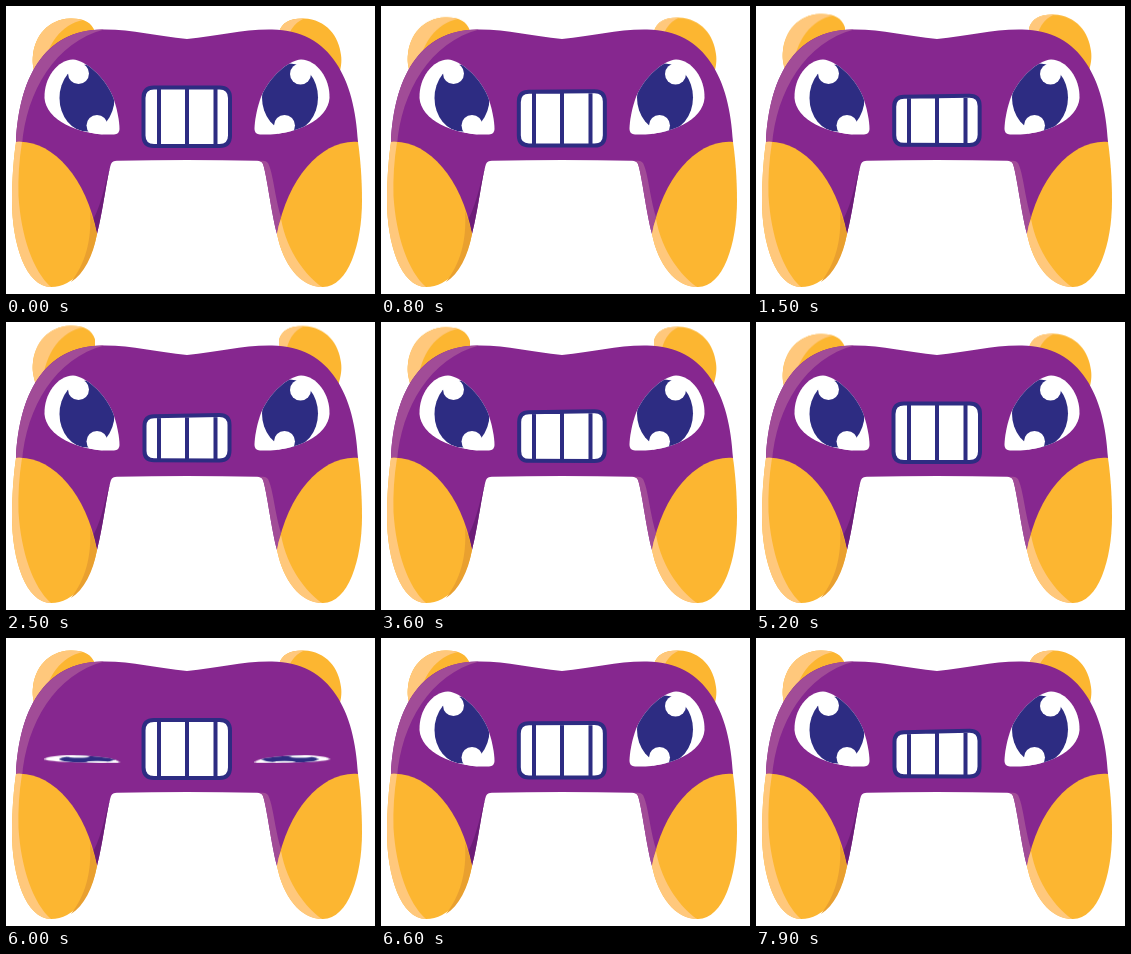
Write an HTML page that moves like this. It is 369 by 288 pixels and loops after 8000 ms.

```html
<!DOCTYPE html>
<html lang="en">
<head>
<meta charset="utf-8">
<title>Gamepad character</title>
<style>
  html, body { margin: 0; width: 100%; height: 100%; overflow: hidden; background: #fff; }
  svg { display: block; width: 369px; height: 288px; }

  .purple { fill: #86278f; }
  .purple-light { fill: #a14c97; }
  .purple-dark { fill: #6c1d78; }
  .yellow { fill: #fcb631; }
  .yellow-light { fill: #ffc87c; }
  .yellow-dark { fill: #e9a02f; }
  .navy { fill: #2d2c82; }
  .white { fill: #fff; }

  .button, .eye, .mouth { animation: 8s linear infinite; }
  .button { animation-timing-function: cubic-bezier(.35, 0, .65, 1); }
  .button.left { animation-name: rise-left; }
  .button.right { animation-name: rise-right; }
  .eye { animation-name: blink; transform-origin: 0 124.5px; }
  /* Open and nearly shut jaw, with the tooth gaps as extra strokes */
  .mouth {
    --open: path("M148 81.5L213.5 81.5Q224 81.5 224 92L224 129.5Q224 140 213.5 140L148 140Q137.5 140 137.5 129.5L137.5 92Q137.5 81.5 148 81.5ZM153 82L153 140M181 82L181 140M209.5 82L209.5 140");
    --shut: path("M148 94.3L213.5 93Q223.5 93 223.5 103L223.5 128.5Q223.5 138.5 213.5 138.5L148 138.3Q138.5 138.3 138.5 129L138.5 104Q138.5 94.5 148 94.3ZM153 94.5L153 138M181 94L181 138M209.5 93.5L209.5 138");
    animation-name: bite;
    fill: #fff;
    stroke: #2d2c82;
    stroke-width: 4;
  }

  @keyframes rise-left {
    0%, 2.5%, 70%, 100% { transform: translateY(0); }
    35% { transform: translateY(-9px); }
  }
  @keyframes rise-right {
    0%, 3.75%, 71.25%, 100% { transform: translateY(0); }
    36.5% { transform: translateY(-9px); }
  }
  @keyframes blink {
    0%, 70%, 80%, 100% { transform: scaleY(1); }
    75% { transform: scaleY(.1); }
  }
  @keyframes bite {
    0% { d: var(--open); animation-timing-function: cubic-bezier(.28, .08, .58, 1); }
    32% { d: var(--shut); animation-timing-function: cubic-bezier(.35, 0, .65, 1); }
    66% { d: var(--open); }
    71.25% { d: var(--open); animation-timing-function: cubic-bezier(.36, 0, .7, .95); }
    100% { d: var(--shut); }
  }
</style>
</head>
<body>
<svg viewBox="0 0 369 288">
  <defs>
    <path id="lid" d="M67 53.5C79 54 99 71 107 91C111 102 113.5 115 113.5 123Q113.5 128 108 128.5C75 130 40 115 38.5 92C38 72 51 54 67 53.5Z"/>
    <clipPath id="lid-clip"><use href="#lid"/></clipPath>
    <clipPath id="lid-clip-right"><use href="#lid" transform="matrix(-1 0 0 1 362 0)"/></clipPath>
    <path id="grip" d="M10 136C45 133 80 170 91 228C85 258 68 281 45 281C20 281 6 238 6 195C6 170 8 150 10 136Z"/>
    <path id="knob" d="M30 72C27 62 26 56 27 49C29 30 42 13.5 64 12.5C77 12 86 16 89 26L89 45L60 85Z"/>
  </defs>

  <g class="button left">
    <use href="#knob" class="yellow"/>
    <path class="yellow-light" d="M30 72C27 62 26 56 27 49C29 30 42 13.5 64 12.5Q72 12.2 77 14C56 18 39 38 36 72Z"/>
  </g>
  <g class="button right">
    <use href="#knob" class="yellow" transform="matrix(-1 0 0 1 362 0)"/>
    <path class="yellow-light" d="M273 45V26C276 16 285 12 298 12.5C288 17 281 26 279 45Z"/>
  </g>

  <path class="purple" d="M181 33C150 30 125 23 96 23.5C37 24 13 74 10 136L20 170L91 228C97 205 101 170 105 158Q106.5 154.8 111 154.8Q181 153.4 251 154.8Q255.5 154.8 257 158C261 170 265 205 271 228L342 170L352 136C349 74 325 24 266 23.5C237 23 212 30 181 33Z"/>
  <path class="purple-light" d="M98 23.5C37 23 13 74 10 136L16 140C20 85 50 36 98 23.5Z"/>
  <path class="purple-dark" d="M91 228C97 205 101 170 105 158C100 172 97 195 87 214Z"/>
  <path class="purple-light" d="M251 154.8Q255.5 154.8 257 158C261 170 265 205 271 228L275 211C269 192 267 166 262 157Q260 154.8 257 154.8Z"/>

  <use href="#grip" class="yellow"/>
  <path class="yellow-light" d="M10 136Q13 135.5 16 136C13 155 12 172 12.5 190C15 230 27 265 45 281C20 281 6 238 6 195C6 170 8 150 10 136Z"/>
  <path class="yellow-dark" d="M84 205Q88 215 91 228C87 250 78 268 65 276C79 258 86 235 84 205Z"/>
  <use href="#grip" class="yellow" transform="matrix(-1 0 0 1 362 0)"/>
  <path class="yellow-light" d="M275 213Q272 220 271 228C277 258 294 281 316 281C301 271 281 246 275 213Z"/>

  <g class="eye">
    <use href="#lid" class="white"/>
    <ellipse class="navy" cx="81" cy="92" rx="27.5" ry="33.5" clip-path="url(#lid-clip)"/>
    <circle class="white" cx="72.5" cy="67.5" r="10.5"/>
    <circle class="white" cx="91" cy="119.5" r="10.5" clip-path="url(#lid-clip)"/>
  </g>
  <g class="eye">
    <use href="#lid" class="white" transform="matrix(-1 0 0 1 362 0)"/>
    <ellipse class="navy" cx="284" cy="91.5" rx="28" ry="34" clip-path="url(#lid-clip-right)"/>
    <circle class="white" cx="294.5" cy="68" r="10.5"/>
    <circle class="white" cx="278.5" cy="119.5" r="10.5" clip-path="url(#lid-clip-right)"/>
  </g>

  <path class="mouth"/>
</svg>
</body>
</html>
```
